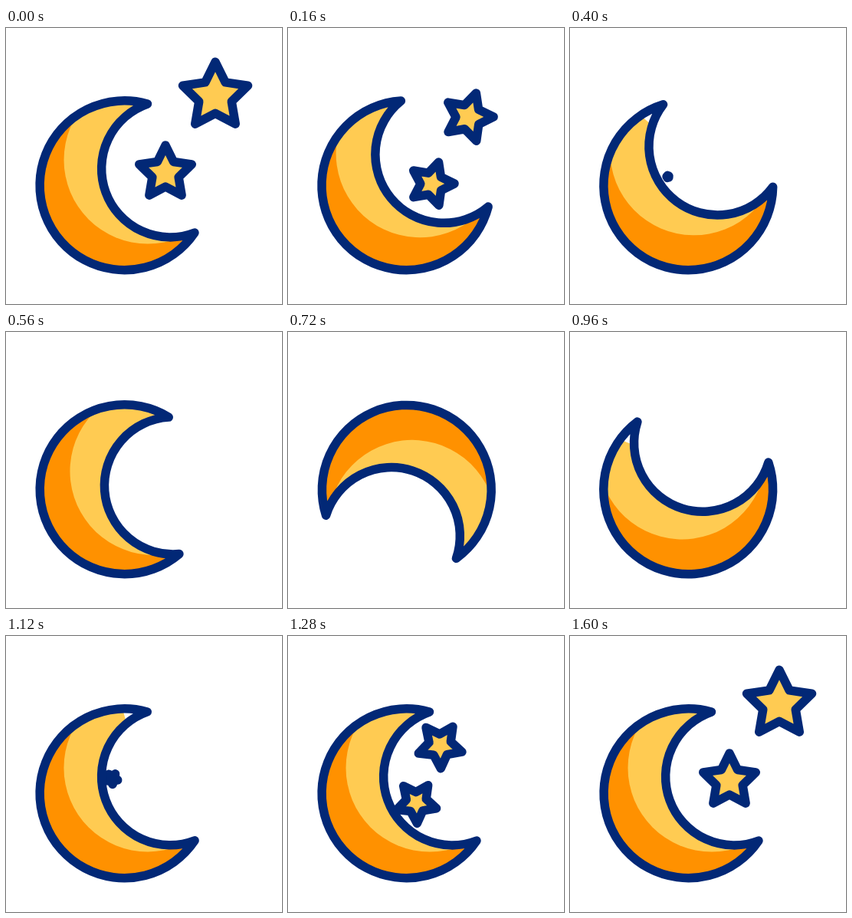
An HTML page for the animation above (2000 ms loop, 360x360 px).

```html
<!DOCTYPE html>
<html lang="en">
<head>
<meta charset="utf-8">
<title>Moon and stars</title>
<style>
  html, body { margin: 0; width: 100%; height: 100%; overflow: hidden; background: #fff; }
  svg { display: block; width: 100vw; height: 100vh; }
  .line { stroke: #022876; stroke-width: 11.5; stroke-linejoin: round; stroke-linecap: round; }
</style>
</head>
<body>
<svg viewBox="0 0 360 360">
  <defs>
    <path id="crescent" d="M184.5 99A110.4 110.4 0 1 0 246 267A89.46 89.46 0 1 1 184.5 99Z"/>
    <clipPath id="inside"><use href="#crescent"/></clipPath>
  </defs>
  <path class="line star" fill="#ffcb52"/>
  <path class="line star" fill="#ffcb52"/>
  <g id="moon">
    <g clip-path="url(#inside)">
      <use href="#crescent" fill="#ff9100"/>
      <circle cx="185" cy="172" r="109.5" fill="#ffcb52"/>
      <path id="glint" d="M153 98L157 112L190 98Z" fill="#fff"/>
    </g>
    <use href="#crescent" class="line" fill="none"/>
  </g>
</svg>
<script>
const LOOP = 2000, STEP = 40, REST = 1600;
const moon = document.getElementById('moon');
const glint = document.getElementById('glint');
const shapes = document.querySelectorAll('.star');

// Home position, radius, travel to the hiding place, shrink exponents in and out
const stars = [
  { x: 273, y: 89, r: 44.7, dx: -151, dy: 109, shrink: [0.95, 1.56] },
  { x: 208, y: 189, r: 36, dx: -82, dy: 57, shrink: [1.23, 2] }
];

const clamp = v => Math.min(1, Math.max(0, v));
const span = (t, a, b) => clamp((t - a) / (b - a));
const smooth = u => u * u * (3 - 2 * u);

// Wind back, then one full clockwise turn
function moonAngle(t) {
  if (t < 400) return -33 * Math.sin(span(t, 0, 400) * Math.PI / 2);
  return -33 + 393 * smooth(span(t, 400, 1127));
}

// 0 = at home, 1 = hidden behind the moon
function hiding(t) {
  return t < 700
    ? smooth(span(t, 20, 450))
    : Math.pow(1 - span(t, 1080, REST), 1.45);
}

function starPath(cx, cy, r, turn) {
  let d = '';
  for (let i = 0; i < 10; i++) {
    const a = (turn - 90 + i * 36) * Math.PI / 180;
    const k = i % 2 ? r * 0.5 : r;
    d += (i ? 'L' : 'M') + (cx + k * Math.cos(a)).toFixed(2) + ' ' + (cy + k * Math.sin(a)).toFixed(2);
  }
  return d + 'Z';
}

function draw(t) {
  moon.setAttribute('transform', `rotate(${moonAngle(t)} 154.5 205.6)`);
  const gap = (t >= 280 && t <= 520) || (t >= 880 && t <= 1160);
  glint.setAttribute('visibility', gap ? 'visible' : 'hidden');
  const p = hiding(t);
  stars.forEach((s, i) => {
    const size = 1 - Math.pow(p, s.shrink[t < 700 ? 0 : 1]);
    shapes[i].setAttribute('visibility', size > 0.001 ? 'visible' : 'hidden');
    shapes[i].setAttribute('d', starPath(s.x + s.dx * p, s.y + s.dy * p, s.r * size, 360 * p));
  });
}

const start = performance.now();
function tick() {
  const t = (performance.now() - start) % LOOP;
  draw(Math.min(REST, Math.floor(t / STEP) * STEP));
  requestAnimationFrame(tick);
}
draw(0);
requestAnimationFrame(tick);
</script>
</body>
</html>
```
